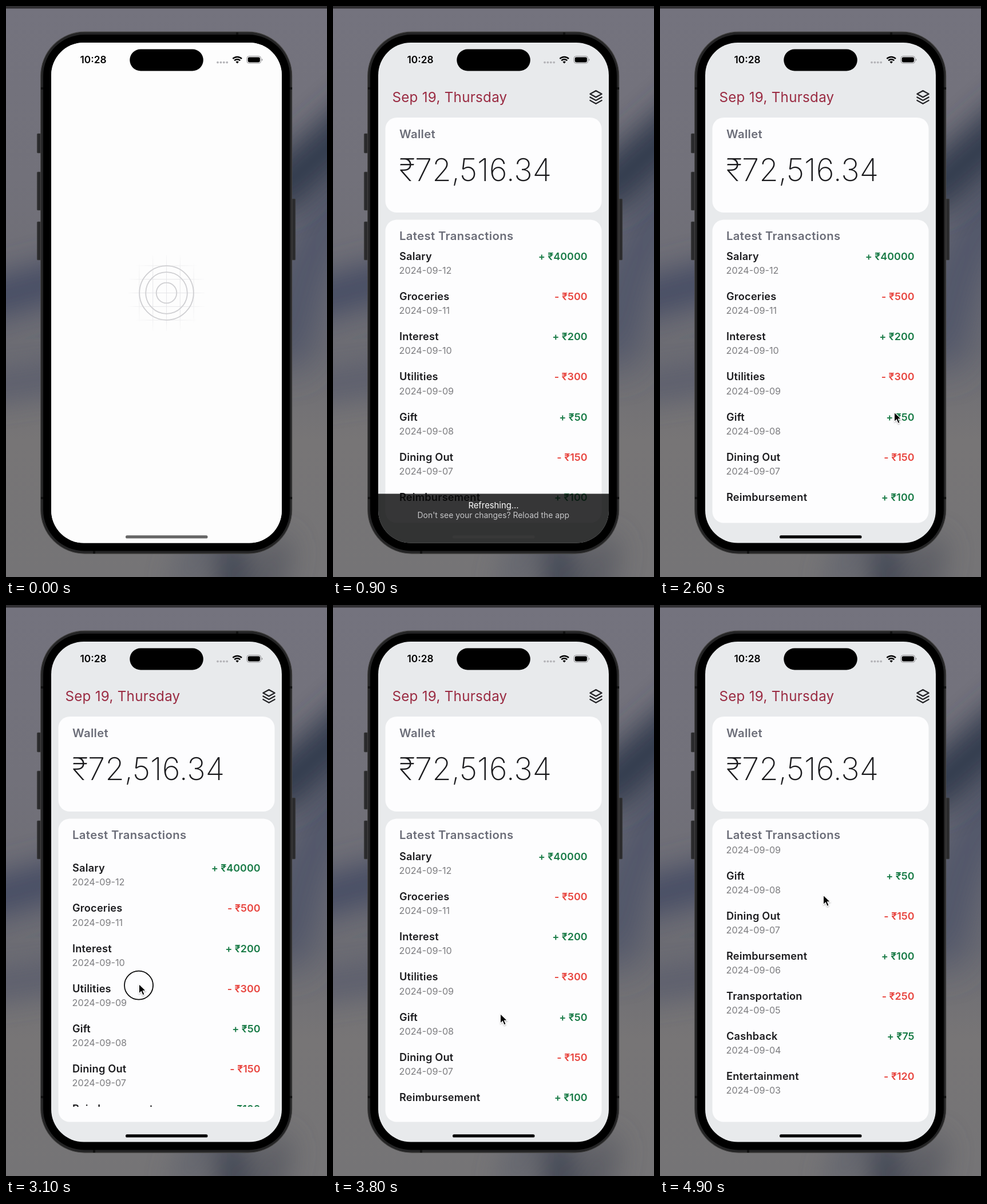
Animation of 561 by 998 pixels, one loop 5 s. Source, as an HTML page:

```html
<!DOCTYPE html>
<html lang="en">
<head>
<meta charset="utf-8">
<title>Wallet app</title>
<style>
  html, body { margin: 0; width: 100%; height: 100%; overflow: hidden; background: #73727a; }
  svg { display: block; width: 100%; height: 100%; }
  text { font-family: Inter, "Open Sans", sans-serif; }
  .head { font-size: 20.3px; font-weight: 600; fill: #6b6d78; letter-spacing: .36px; }
  .name { font-size: 18.2px; font-weight: 600; fill: #1b1b1e; letter-spacing: .2px; }
  .day { font-size: 16.2px; fill: #7d7d80; }
  .sum { font-size: 17.9px; font-weight: 600; text-anchor: end; }
  .mid { text-anchor: middle; }
</style>
</head>
<body>
<svg viewBox="0 0 561 998" preserveAspectRatio="none">
  <defs>
    <linearGradient id="wall" x1="0" y1="0" x2="0" y2="1">
      <stop offset="0" stop-color="#74737e"/>
      <stop offset=".3" stop-color="#72717a"/>
      <stop offset=".6" stop-color="#6c6c73"/>
      <stop offset=".76" stop-color="#777576"/>
      <stop offset="1" stop-color="#757476"/>
    </linearGradient>
    <radialGradient id="fade">
      <stop offset=".55" stop-color="#fff"/>
      <stop offset="1" stop-color="#000"/>
    </radialGradient>
    <mask id="gridMask"><rect x="208" y="429" width="145" height="145" fill="url(#fade)"/></mask>
    <filter id="soft" filterUnits="userSpaceOnUse" x="-150" y="-100" width="861" height="1250">
      <feGaussianBlur stdDeviation="26"/>
    </filter>
    <filter id="softer" filterUnits="userSpaceOnUse" x="-150" y="-100" width="861" height="1250">
      <feGaussianBlur stdDeviation="34"/>
    </filter>
    <filter id="shade" x="-50%" y="-50%" width="200%" height="200%">
      <feDropShadow dx="0" dy="1.2" stdDeviation="1.1" flood-color="#000" flood-opacity=".35"/>
    </filter>
    <clipPath id="screenClip"><rect x="79" y="64" width="403" height="874.5" rx="57"/></clipPath>
    <clipPath id="listClip"><rect x="91" y="412" width="379" height="465"/></clipPath>
  </defs>

  <rect width="561" height="998" fill="url(#wall)"/>
  <g fill="none" stroke-linecap="round">
    <path d="M600 330Q525 400 490 590" stroke="#4d5267" stroke-width="84" filter="url(#softer)"/>
    <g filter="url(#soft)">
      <path d="M640 180L480 320" stroke="#333a4d" stroke-width="84"/>
      <path d="M-40 515L110 475" stroke="#444b64" stroke-width="66"/>
      <path d="M-40 668L110 645" stroke="#54586b" stroke-width="40"/>
      <path d="M310 1010L350 900" stroke="#5d606c" stroke-width="36"/>
      <path d="M396 1050V950" stroke="#3a4050" stroke-width="52"/>
      <path d="M450 1050L475 950" stroke="#55575f" stroke-width="44"/>
    </g>
  </g>
  <rect width="561" height="4.5" fill="#302f32"/>

  <g fill="#2a2a2c" stroke="#444446" stroke-width=".6">
    <rect x="54.3" y="223" width="8" height="34" rx="1.5"/>
    <rect x="54.3" y="290" width="8" height="67" rx="1.5"/>
    <rect x="54.3" y="377" width="8" height="67" rx="1.5"/>
    <rect x="498" y="337" width="7.8" height="107" rx="1.5"/>
  </g>
  <rect x="60.7" y="45.2" width="439" height="912" rx="77" fill="#242425" stroke="#454443" stroke-width="1.2"/>
  <path d="M61 144h5M61 860h5M495 144h5M495 860h5M404 46v5M154 952v5" stroke="#111" stroke-width="4"/>
  <rect x="65" y="50" width="431" height="902.5" rx="72" fill="#000"/>

  <g clip-path="url(#screenClip)">
    <rect x="79" y="64" width="403" height="875" fill="#e8eaec"/>
    <g id="app">
      <text x="103.5" y="168" font-size="24.2" fill="#9a2b42" letter-spacing=".25">Sep 19, Thursday</text>
      <g transform="translate(459.5 159.4) scale(1.02 1.13) translate(-12 -12)" fill="none" stroke="#242427" stroke-width="2.1" stroke-linejoin="round" stroke-linecap="round">
        <path d="M12 2L2 7l10 5 10-5zM2 17l10 5 10-5M2 12l10 5 10-5"/>
      </g>
      <g fill="#fdfdfe">
        <rect x="91.5" y="195" width="378" height="166" rx="20"/>
        <rect x="91.5" y="373.5" width="378" height="530" rx="20"/>
      </g>
      <text class="head" x="116" y="230.5">Wallet</text>
      <text x="116" y="306" font-size="54.5" font-weight="200" fill="#1b1b1e">₹72,516.34</text>
      <text class="head" x="116" y="409">Latest Transactions</text>
      <g clip-path="url(#listClip)"><g id="list"></g></g>
    </g>
    <g id="banner">
      <rect x="79" y="852.5" width="403" height="87" fill="#050505" fill-opacity=".8"/>
      <text class="mid" x="280.5" y="877.5" font-size="14.8" fill="#fff">Refreshing...</text>
      <text class="mid" x="280.3" y="895" font-size="13.9" fill="#c6c6c8">Don't see your changes? Reload the app</text>
    </g>
    <g id="splash">
      <rect x="79" y="64" width="403" height="875" fill="#fdfdfd"/>
      <g id="grid" mask="url(#gridMask)" stroke="#e6e6e9" stroke-width="1"></g>
      <g fill="none" stroke="#cfcfd2" stroke-width="1.8">
        <circle cx="280.5" cy="501.5" r="47.3"/>
        <circle cx="280.5" cy="501.5" r="36.3"/>
        <circle cx="280.5" cy="501.5" r="17.8"/>
      </g>
    </g>
    <rect id="home" x="209" y="925.3" width="143.5" height="5.2" rx="2.6"/>

    <text class="mid" x="152.5" y="100.4" font-size="17.3" font-weight="600">10:28</text>
    <rect x="216.3" y="75.5" width="128.5" height="38" rx="19"/>
    <g fill="#b4b4b8">
      <circle cx="370" cy="98.6" r="1.9"/><circle cx="375.4" cy="98.6" r="1.9"/>
      <circle cx="380.8" cy="98.6" r="1.9"/><circle cx="386.2" cy="98.6" r="1.9"/>
    </g>
    <g fill="none" stroke="#000" stroke-width="2.5">
      <path d="M396.4 92.2a11 11 0 0 1 15.6 0M399.2 95.4a7 7 0 0 1 10 0"/>
    </g>
    <path d="M404.2 100.6l-2.7-2.8a3.9 3.9 0 0 1 5.4 0z"/>
    <rect x="421" y="87.7" width="24.6" height="12.4" rx="3.8" fill="none" stroke="#8d8d90" stroke-width="1"/>
    <rect x="422.7" y="89.4" width="21.2" height="9" rx="2.4"/>
    <path d="M447 92v4q1.5-.5 1.5-2t-1.5-2z" fill="#8d8d90"/>
  </g>

  <g id="cursor">
    <circle id="touch" cx="-.4" cy="2.2" r="25" fill="none" stroke="#0b0b0b" stroke-width="1.8"/>
    <path d="M0 0V16.6L3.9 13L6.7 19.4L9.6 18.1L6.9 11.9H12.2Z" fill="#000" stroke="#fff" stroke-width="1.1" filter="url(#shade)"/>
  </g>
</svg>
<script>
const LOOP = 5000, STEP = 100;
const $ = id => document.getElementById(id);
const clamp = v => Math.min(1, Math.max(0, v));

const entries = [
  ["Salary", 40000], ["Groceries", -500], ["Interest", 200], ["Utilities", -300],
  ["Gift", 50], ["Dining Out", -150], ["Reimbursement", 100],
  ["Transportation", -250], ["Cashback", 75], ["Entertainment", -120]
];

$("list").innerHTML = entries.map(([name, sum], i) => {
  const y = 444 + i * 70.13;
  const day = String(12 - i).padStart(2, "0");
  const color = sum > 0 ? "#177a45" : "#e8453f";
  return `<text class="name" x="116" y="${y}">${name}</text>
    <text class="day" x="115.6" y="${y + 24.2}">2024-09-${day}</text>
    <text class="sum" x="444.5" y="${y}" fill="${color}">${sum > 0 ? "+" : "-"} ₹${Math.abs(sum)}</text>`;
}).join("");

$("grid").innerHTML = [-2, -1, 0, 1, 2].map(k => {
  const d = k * 23.8;
  return `<path d="M${280.5 + d} 435v133M214 ${501.5 + d}h133"/>`;
}).join("");

// time, x, y of the pointer tip
const path = [
  [2400, 590, 800], [2800, 229, 620], [3100, 232.4, 662.5], [3400, 244, 712],
  [3500, 252, 716], [3800, 292.5, 714.5], [3950, 290, 722],
  [4300, 262, 625], [4500, 255.5, 603.5], [4900, 285.5, 507]
];
const pull = { start: 2800, end: 3400 };
const flick = { start: 3950, end: 4300 };
const during = (t, span) => t >= span.start && t < span.end;

function pointer(t) {
  const i = path.findIndex(p => p[0] >= t);
  if (i < 0) return path[path.length - 1].slice(1);
  if (i === 0) return path[0].slice(1);
  const [a, b] = [path[i - 1], path[i]];
  const k = (t - a[0]) / (b[0] - a[0]);
  return [a[1] + (b[1] - a[1]) * k, a[2] + (b[2] - a[2]) * k];
}

// Overscroll resistance for a drag of d pixels
const rubber = d => 465 * (1 - 1 / (d * 0.55 / 465 + 1));

function scroll(t) {
  const dragged = span => pointer(Math.min(t, span.end))[1] - pointer(span.start)[1];
  if (t < pull.start) return 0;
  if (t < pull.end) return rubber(dragged(pull));
  if (t < flick.start) {
    const s = (t - pull.end) / 82;
    return rubber(dragged(pull)) * (1 + s) * Math.exp(-s);
  }
  const glide = t > flick.end ? 206 * (1 - Math.exp((flick.end - t) / 474)) : 0;
  return dragged(flick) - glide;
}

function show(id, on) { $(id).setAttribute("visibility", on ? "visible" : "hidden"); }

function draw(t) {
  const splash = t < 400;
  const banner = splash ? 0 : 1 - clamp((t - 1300) / 300);
  show("splash", splash);
  $("banner").setAttribute("opacity", banner);
  const gray = splash ? 102 : Math.round(56 * banner);
  $("home").setAttribute("fill", `rgb(${gray},${gray},${gray})`);
  $("list").setAttribute("transform", `translate(0 ${scroll(t).toFixed(2)})`);
  const [x, y] = pointer(t);
  $("cursor").setAttribute("transform", `translate(${x} ${y})`);
  $("cursor").setAttribute("display", t > 2400 ? "inline" : "none");
  $("touch").setAttribute("display", during(t, pull) || during(t, flick) ? "inline" : "none");
}

function tick() {
  const t = performance.now() % LOOP;
  draw(Math.floor(t / STEP) * STEP);
  requestAnimationFrame(tick);
}
tick();
</script>
</body>
</html>
```
